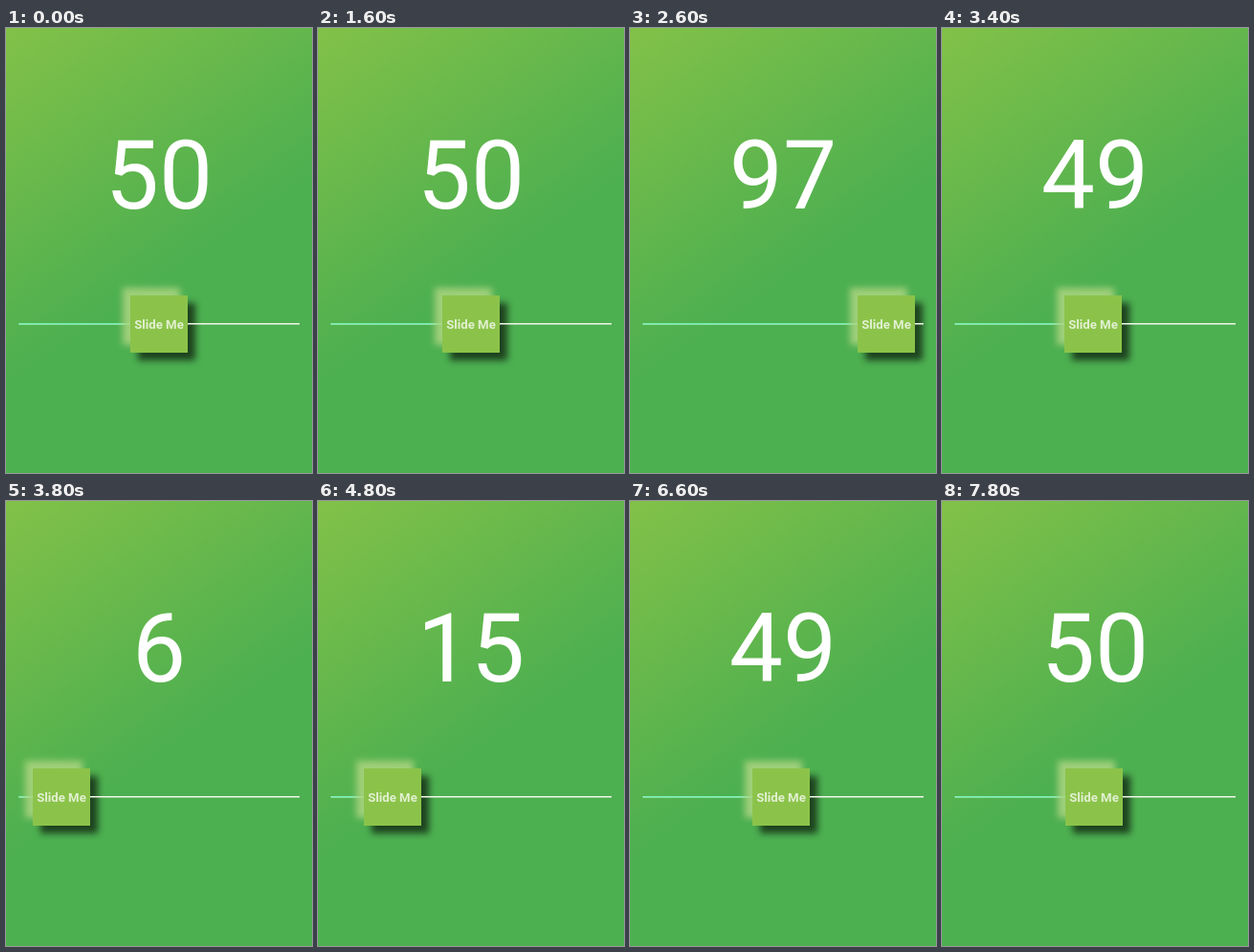
These frames come from a looping animation (320x466 px, 8 s). An HTML page:

```html
<!DOCTYPE html>
<html lang="en">
<head>
<meta charset="utf-8">
<title>Slide Me</title>
<style>
  html, body { margin: 0; width: 100%; height: 100%; overflow: hidden; background: #4caf50; }
  svg { display: block; width: 100vw; height: 100vh; }
  text { font-family: Roboto, sans-serif; text-anchor: middle; }
</style>
</head>
<body>
<svg viewBox="0 0 320 466">
  <defs>
    <linearGradient id="backdrop" gradientUnits="userSpaceOnUse" x1="0" y1="0" x2="176" y2="256">
      <stop offset="0" stop-color="#82c148"/>
      <stop offset="1" stop-color="#4caf50"/>
    </linearGradient>
    <filter id="blur" x="-40%" y="-40%" width="180%" height="180%">
      <feGaussianBlur stdDeviation="3.8"/>
    </filter>
  </defs>
  <rect width="320" height="466" fill="url(#backdrop)"/>
  <text id="number" x="160" y="188.5" font-size="100" fill="#fff"></text>
  <rect class="thumb" x="8" y="288" width="60" height="60" fill="#000" opacity=".62" filter="url(#blur)"/>
  <g stroke-width="1.6">
    <path d="M13.5 309.7H307" stroke="#f1f8e9"/>
    <path id="active" stroke="#69f0ae" stroke-opacity=".9"/>
  </g>
  <rect class="thumb" x="-8" y="272" width="60" height="60" fill="#aed581" opacity=".85" filter="url(#blur)"/>
  <g class="thumb">
    <rect y="280" width="60" height="60" fill="#8bc34a"/>
    <text x="30" y="315" font-size="13.2" font-weight="700" fill="#fff" fill-opacity=".75">Slide Me</text>
  </g>
</svg>
<script>
  const LOOP = 8000, STEP = 200;

  // Thumb position: [time in ms, left edge in px]
  const stops = [
    [0, 130], [1600, 130], [2800, 246], [3984, 14], [4130, 14],
    [6000, 134], [6800, 127], [7400, 129], [LOOP, 129]
  ];
  const number = document.getElementById('number');
  const active = document.getElementById('active');
  const thumbParts = document.querySelectorAll('.thumb');

  const ease = p => (1 - Math.cos(Math.PI * p)) / 2;

  function thumbLeft(time) {
    const next = stops.findIndex(([end]) => time < end);
    const [t0, x0] = stops[next - 1], [t1, x1] = stops[next];
    return x0 + (x1 - x0) * ease((time - t0) / (t1 - t0));
  }

  function draw(now) {
    const time = Math.floor((now % LOOP) / STEP) * STEP;
    const left = thumbLeft(time);
    const value = Math.max(0, Math.min(100, Math.ceil((left - 14.4) / 2.33)));
    number.textContent = value;
    active.setAttribute('d', `M13.5 309.7H${left + 30}`);
    thumbParts.forEach(part => part.setAttribute('transform', `translate(${Math.round(left)} 0)`));
  }

  let start;
  function tick(now) {
    start ??= now;
    draw(now - start);
    requestAnimationFrame(tick);
  }
  draw(0);
  requestAnimationFrame(tick);
</script>
</body>
</html>
```
